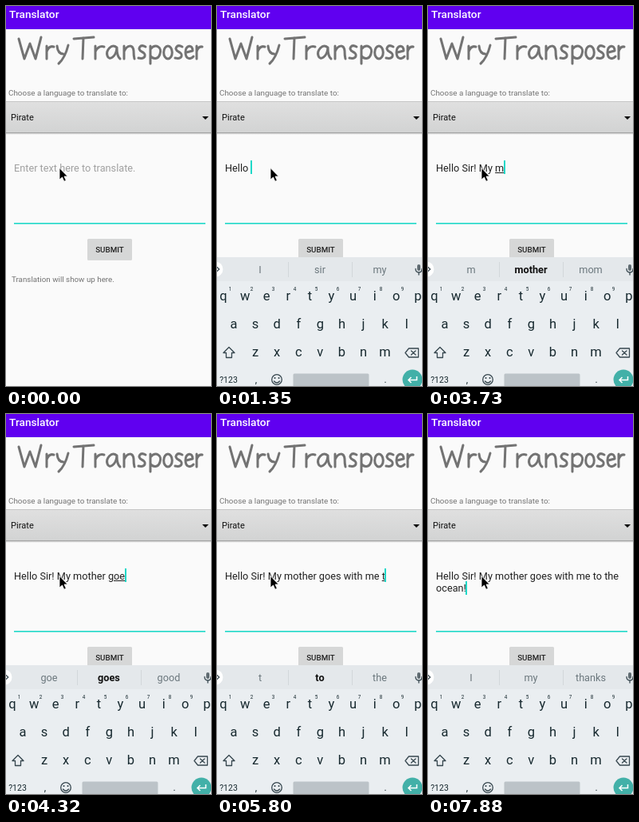
Write an HTML page that moves like this. It is 257x475 px and loops after 8000 ms.

```html
<!DOCTYPE html>
<html lang="en">
<head>
<meta charset="utf-8">
<title>Translator</title>
<style>
html, body { margin: 0; width: 100%; height: 100%; overflow: hidden; background: #fafafa; }
body { position: relative; font-family: Roboto, sans-serif; }
svg { position: absolute; left: 0; top: 0; }
text { font-family: Roboto, sans-serif; }
#edit { position: absolute; left: 10px; top: 194.6px; font-size: 12.72px; line-height: 15.5px; color: #212121; white-space: pre; }
#edit.hint { color: #a0a0a0; }
#edit u { text-underline-offset: 1px; text-decoration-thickness: 1px; }
#edit i { position: absolute; width: 2px; height: 17px; margin: -1.2px 0 0 -.5px; background: #1fd8c8; }
.icon { fill: none; stroke: #37474f; stroke-width: 1.3; stroke-linejoin: round; stroke-linecap: round; }
</style>
</head>
<body>
<svg width="257" height="475" viewBox="0 0 257 475">
  <defs>
    <linearGradient id="spin" x2=".04" y2="1">
      <stop stop-color="#e0e0e0"/><stop offset="1" stop-color="#d2d3d3"/>
    </linearGradient>
    <linearGradient id="shade" x2="0" y2="1">
      <stop stop-color="#000" stop-opacity=".28"/><stop offset="1" stop-color="#000" stop-opacity="0"/>
    </linearGradient>
  </defs>
  <rect width="257" height="29" fill="#6000f0"/>
  <text x="4" y="15" font-size="13.7" font-weight="500" fill="#fff">Translator</text>

  <g role="img" aria-label="Wry Transposer" fill="none" stroke="#737373" stroke-width="3" stroke-linecap="round" stroke-linejoin="round">
    <path d="M16 41L23 66L30 47L37 66L44 39"/>
    <path d="M51 50V66M51 57Q54 49 60 51"/>
    <path d="M64 50Q65 60 72 60M78 49Q74 65 66 72"/>
    <g transform="translate(-10)">
      <path d="M95 41L120 39M107 40L106 66"/>
      <path d="M122 50V66M122 57Q126 49 133 51"/>
      <path d="M149 52C142 46 135 56 137 62C139 69 148 64 149 52Q149 63 153 66"/>
      <path d="M158 50V66M158 57C162 48 169 48 170 56Q170 62 171 66"/>
      <path id="s" d="M185 51C178 47 174 54 180 57C187 60 185 67 176 65"/>
      <path d="M191 50V72M191 54C198 46 206 52 203 60C201 67 194 67 191 62"/>
      <ellipse cx="213" cy="58" rx="5.3" ry="8"/>
      <use href="#s" x="46"/>
      <path d="M236 58L244 56C244 47 235 49 235 58C235 67 242 67 245 63"/>
      <path d="M249 50V66M249 57Q251 50 256 51"/>
    </g>
  </g>

  <text x="3" y="112" font-size="9.9" fill="#737373">Choose a language to translate to:</text>
  <rect y="119" width="257" height="40" fill="url(#spin)"/>
  <rect y="119" width="257" height="1" fill="#c6c6c6"/>
  <rect y="158" width="257" height="3" fill="url(#shade)"/>
  <text x="6" y="143" font-size="11.1" fill="#111">Pirate</text>
  <path d="M246 138H254L250 142Z" fill="#000"/>
  <rect x="10" y="271" width="240" height="1.6" fill="#1fd8c8"/>
  <rect x="102" y="292" width="56" height="26" rx="1.5" fill="#000" opacity=".13"/>
  <rect x="102" y="291" width="56" height="26" rx="1.5" fill="#d6d7d7"/>
  <text x="130" y="307.5" font-size="9.8" font-weight="500" fill="#222" text-anchor="middle">SUBMIT</text>
  <text x="7" y="345" font-size="9.8" fill="#737373">Translation will show up here.</text>

  <g id="board">
    <rect y="314" width="257" height="161" fill="#eaeef1"/>
    <rect y="314" width="257" height="30" fill="#e4e8eb"/>
    <path d="M89.5 320V339M169.5 320V339" stroke="#d2d7da"/>
    <circle cx="-2" cy="329" r="9.5" fill="#fff"/>
    <path class="icon" d="M0 326.5L2.8 329L0 331.5"/>
    <rect x="251" y="323" width="4" height="8" rx="2" fill="#5f6b71"/>
    <path class="icon" d="M249 328.5Q249 333 253 333T257 328.5M253 333V336"/>
    <g id="tips" font-size="12.7" text-anchor="middle" fill="#6b777d">
      <text x="54" y="334"></text><text x="129" y="334"></text><text x="204" y="334"></text>
    </g>
    <g id="keys" fill="#17292f" text-anchor="middle"></g>
    <path class="icon" d="M15 426.5L22 433.5H18.5V439.5H11.5V433.5H8Z"/>
    <path class="icon" d="M236 433.5L240.5 428H252.5V439H240.5ZM243.5 431L249 436M249 431L243.5 436"/>
    <circle class="icon" cx="75" cy="467" r="6.3"/>
    <path class="icon" d="M71.5 469Q75 473 78.5 469"/>
    <path d="M72.5 465h.1M77.5 465h.1" stroke="#37474f" stroke-width="2" stroke-linecap="round"/>
    <rect x="95.5" y="459.5" width="95" height="16" rx="1.5" fill="#bcc3c8"/>
    <circle cx="245" cy="467" r="12.5" fill="#42b0a8"/>
    <path d="M250.5 463V467.5H240M243.5 464L240 467.5L243.5 471" fill="none" stroke="#fff" stroke-width="1.5"/>
  </g>
</svg>
<div id="edit"></div>
<svg width="257" height="475" viewBox="0 0 257 475">
  <path d="M67 202.5V217L70.500 214L72.800 219.200L75.300 218.100L73 213H77.300Z" fill="#000" stroke="#fff" stroke-width=".8"/>
</svg>
<script>
const $ = id => document.getElementById(id);
const said = 'Hello Sir! My mother goes ';
const line = said + 'with me to the ';

// start time, typed text ("|" opens the underlined word), word suggestions
const steps = [
  [450, '', 'I,the,my'],
  [600, '|H', 'H,Hi,Hey'],
  [750, '|He', 'He,Hey,Hello'],
  [900, '|Hel', 'Hel,Hello,Help'],
  [1050, '|Hell', 'Hell,Hello,Hells'],
  [1200, '|Hello', 'Hello,Hello,Hells'],
  [1350, 'Hello ', 'I,sir,my'],
  [1500, 'Hello |S', 'S,So,She'],
  [1650, 'Hello |Si', 'Si,Sir,Since'],
  [1800, 'Hello |Sir', 'Sir,Sir,Sire'],
  [2250, 'Hello Sir!', 'I,my,thanks'],
  [2540, 'Hello Sir! ', 'I,my,thanks'],
  [2990, 'Hello Sir! |M', 'M,My,Me'],
  [3290, 'Hello Sir! |My', 'My,May,Mystery'],
  [3590, 'Hello Sir! My ', 'name,phone,friend'],
  [3730, 'Hello Sir! My |m', 'm,mother,mom'],
  [3880, 'Hello Sir! My mother ', 'is,and,in'],
  [4030, 'Hello Sir! My mother |g', 'g,got,gave'],
  [4170, 'Hello Sir! My mother |go', 'go,got,goes'],
  [4320, 'Hello Sir! My mother |goe', 'goe,goes,good'],
  [4470, 'Hello Sir! My mother |goes', 'goes,goes,does'],
  [4610, said, 'to,by,on'],
  [4760, said + '|w', 'w,with,we'],
  [4910, said + '|wi', 'wi,will,with'],
  [5060, said + '|wit', 'wi,with,without'],
  [5210, said + 'with ', 'the,me,a'],
  [5360, said + 'with |m', 'm,my,me'],
  [5510, said + 'with |me', 'me,me,men'],
  [5650, said + 'with me ', 'and,to,on'],
  [5800, said + 'with me |t', 't,to,the'],
  [6250, said + 'with me |to', 'to,to,too'],
  [6400, said + 'with me to ', 'the,get,my'],
  [6550, said + 'with me to |t', 't,the,take'],
  [6690, said + 'with me to |th', 'th,the,this'],
  [6840, line, 'same,store,first'],
  [7140, line + '\n|o', 'o,other,one'],
  [7290, line + '\n|oc', 'oc,ocean,occur'],
  [7440, line + '\n|ocea', 'ocea,ocean,oceans'],
  [7590, line + '\n|ocean', 'ocean,ocean,oceans'],
  [7880, line + '\nocean!', 'I,my,thanks']
];

const key = (x, y, size, label) => `<text x="${x}" y="${y}" font-size="${size}">${label}</text>`;
const row = (word, x, y) => [...word].map((c, i) => key(x + i * 27.1, y, 16.5, c)).join('');
$('keys').innerHTML = row('qwertyuiop', 8, 367.5) + row('asdfghjkl', 21, 402.5) + row('zxcvbnm', 48, 437.5) +
  [...'123456789'].map((c, i) => key(16.5 + i * 27, 356, 6.3, c)).join('') +
  key(14.5, 471, 10.5, '?123') + key(49, 470.5, 12, ',') + key(211, 470.5, 12, '.');

const tips = [...$('tips').children];
let shown;

function show(t) {
  const step = steps.findLast(s => s[0] <= t);
  const [, typed = '', words = ''] = step || [];
  const state = [typed, words, t < 150].join();
  if (state === shown) return;
  shown = state;
  const [done, active = ''] = typed.split('|');
  const caret = t < 150 ? '' : '<i></i>';
  $('edit').className = typed ? '' : 'hint';
  $('edit').innerHTML = typed ? `${done}<u>${active}</u>${caret}` : caret + 'Enter text here to translate.';
  $('board').style.display = step ? '' : 'none';
  words.split(',').forEach((w, i) => tips[i].textContent = w);
  tips[1].setAttribute('font-weight', active ? 700 : 400);
  tips[1].setAttribute('fill', active ? '#111' : '#6b777d');
}

function frame() {
  show(performance.now() % 8000);
  requestAnimationFrame(frame);
}
frame();
</script>
</body>
</html>
```
